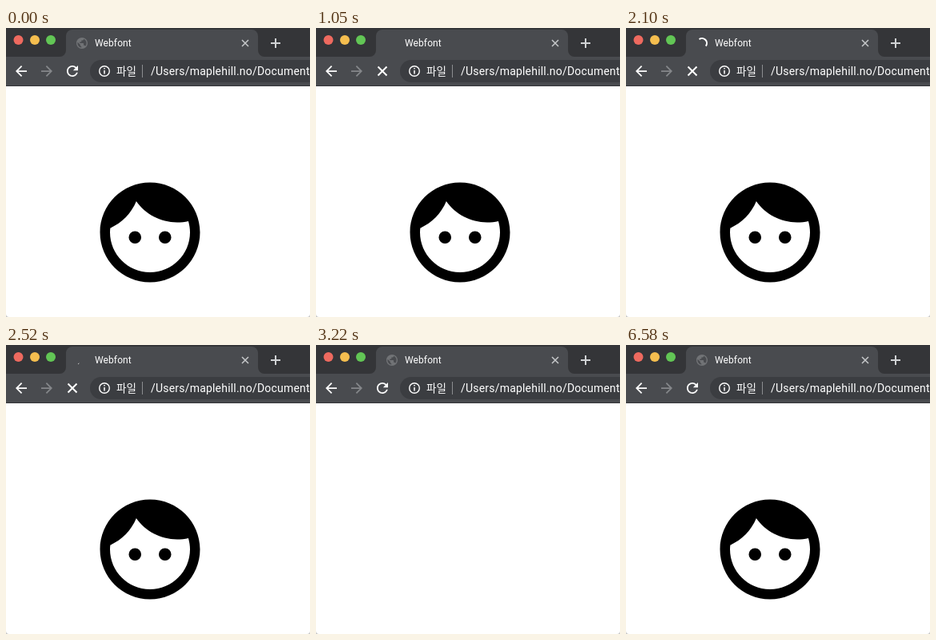
An HTML page that plays this animation: 380 px wide and 362 px high, repeating every 7.21 s.

```html
<!DOCTYPE html>
<html lang="ko">
<head>
<meta charset="utf-8">
<title>Webfont</title>
<style>
  html, body { margin: 0; width: 100%; height: 100%; overflow: hidden; background: #fff; }
  svg { display: block; width: 380px; height: 362px; }
  text { font-family: Roboto, "Noto Sans CJK KR", sans-serif; fill: #fff; white-space: pre; }
  .line { fill: none; stroke: #fff; stroke-width: 2; }
</style>
</head>
<body>
<svg viewBox="0 0 380 362">
  <!-- window frame -->
  <rect width="380" height="73" fill="#343538"/>
  <circle cx="15.5" cy="15" r="6" fill="#ee6a5f"/>
  <circle cx="36" cy="15" r="6" fill="#f5be4f"/>
  <circle cx="56" cy="15" r="6" fill="#62c655"/>
  <path fill="#494b4f" d="M0 36H67a8 8 0 0 0 8-8V10a8 8 0 0 1 8-8H307a8 8 0 0 1 8 8V28a8 8 0 0 0 8 8H380V72H0z"/>
  <path fill="#3b3d41" d="M380 40H119a14 14 0 0 0 0 28H380z"/>

  <!-- tab -->
  <text x="111" y="23" font-size="12" letter-spacing=".1">Webfont</text>
  <path class="line" style="stroke:#c6c8ca;stroke-width:1.5" d="M295 15l8 8m0-8l-8 8"/>
  <path class="line" style="stroke:#d0d2d4" d="M331 19h12m-6-6v12"/>
  <path id="globe" fill="#717376" transform="translate(86.6 10.6) scale(.7)" d="M12 2C6.48 2 2 6.48 2 12s4.48 10 10 10 10-4.48 10-10S17.52 2 12 2zm-1 17.93c-3.95-.49-7-3.85-7-7.93 0-.62.08-1.21.21-1.79L9 15v1c0 1.1.9 2 2 2v1.93zm6.9-2.54c-.26-.81-1-1.39-1.9-1.39h-1v-3c0-.55-.45-1-1-1H8v-2h2c.55 0 1-.45 1-1V7h2c1.1 0 2-.9 2-2v-.41c2.93 1.19 5 4.06 5 7.41 0 2.08-.8 3.97-2.1 5.39z"/>
  <path id="spinner" class="line"/>

  <!-- toolbar -->
  <path id="back" fill="#fff" transform="translate(8.5 43.5) scale(.875)" d="M20 11H7.83l5.59-5.59L12 4l-8 8 8 8 1.41-1.41L7.83 13H20v-2z"/>
  <path fill="#85878a" transform="translate(61.5 43.5) scale(-.875 .875)" d="M20 11H7.83l5.59-5.59L12 4l-8 8 8 8 1.41-1.41L7.83 13H20v-2z"/>
  <path id="reload" fill="#fff" transform="translate(72.5 43.5) scale(.875)" d="M17.65 6.35C16.2 4.9 14.21 4 12 4c-4.42 0-7.99 3.58-7.99 8s3.57 8 7.99 8c3.73 0 6.84-2.55 7.73-6h-2.08c-.82 2.33-3.04 4-5.65 4-3.31 0-6-2.69-6-6s2.69-6 6-6c1.66 0 3.14.69 4.22 1.78L13 11h7V4l-2.35 2.35z"/>
  <path id="stop" class="line" d="M77.5 48.5l11 11m0-11l-11 11"/>
  <circle class="line" cx="123" cy="54" r="6.3" style="stroke-width:1.4"/>
  <path class="line" style="stroke-width:1.5" d="M123 53v4.5m0-7.5v1.6"/>
  <text x="138" y="59" font-size="13.5">파일</text>
  <path stroke="#8b8d90" d="M170.5 46v16"/>
  <text x="181" y="59" font-size="14" letter-spacing=".2">/Users/maplehill.no/Documents</text>

  <!-- page -->
  <path id="face" transform="translate(105 181) scale(6.25)" d="M12 2C6.48 2 2 6.48 2 12s4.48 10 10 10 10-4.48 10-10S17.52 2 12 2zm0 18c-4.41 0-8-3.59-8-8 0-.29.02-.58.05-.86 2.36-1.05 4.23-2.98 5.21-5.37C11.07 8.33 14.05 10 17.42 10c.78 0 1.53-.09 2.25-.26.21.71.33 1.47.33 2.26 0 4.41-3.59 8-8 8zM7.75 13a1.25 1.25 0 0 0 2.5 0a1.25 1.25 0 0 0-2.5 0zm6 0a1.25 1.25 0 0 0 2.5 0a1.25 1.25 0 0 0-2.5 0z"/>
  <text id="word" x="107" y="295" font-size="143" letter-spacing="-5" style="font-family:'Open Sans','Noto Sans',sans-serif;fill:#000">face</text>
  <path fill="#c4c4c4" d="M0 358v4h4a4 4 0 0 1-4-4zm380 0v4h-4a4 4 0 0 0 4-4z"/>
</svg>
<script>
const LOOP = 7210, STEP = 70;
const LOAD = 1050, SPIN = 1260, BLANK = 3220, WORD = 6370, ICON = 6580;
const HALF = 666, TURN = 1568, MAX_ARC = 270, MIN_ARC = 5;
const $ = id => document.getElementById(id);
const show = (id, on) => { $(id).style.display = on ? "" : "none"; };

// cubic-bezier(.4, 0, .2, 1), solved by bisection
function ease(x) {
  let lo = 0, hi = 1;
  for (let i = 0; i < 24; i++) {
    const s = (lo + hi) / 2, r = 1 - s;
    if (1.2 * r * r * s + 0.6 * r * s * s + s * s * s < x) lo = s; else hi = s;
  }
  return lo * lo * (3 - 2 * lo);
}

// An arc that shrinks to a dot, then grows again, while it revolves
function arc(age) {
  const e = age + 700;
  let start = 133 + 360 * e / TURN + MAX_ARC * Math.floor(e / (2 * HALF));
  let sweep = MAX_ARC * ease(e % HALF / HALF);
  if (Math.floor(e / HALF) % 2 === 0) sweep -= MAX_ARC;
  if (Math.abs(sweep) < MIN_ARC) {
    const min = sweep < 0 ? -MIN_ARC : MIN_ARC;
    start -= min - sweep;
    sweep = min;
  }
  const point = deg => {
    const a = deg * Math.PI / 180;
    return `${95 + 6 * Math.cos(a)} ${19 + 6 * Math.sin(a)}`;
  };
  const large = Math.abs(sweep) > 180 ? 1 : 0, clockwise = sweep > 0 ? 1 : 0;
  return `M${point(start)}A6 6 0 ${large} ${clockwise} ${point(start + sweep)}`;
}

function draw(now) {
  const t = Math.floor(now % LOOP / STEP) * STEP;
  const loading = t >= LOAD && t < BLANK, spinning = loading && t >= SPIN;
  show("globe", !loading);
  show("reload", !loading);
  show("stop", loading);
  show("spinner", spinning);
  if (spinning) $("spinner").setAttribute("d", arc(t - SPIN));
  show("face", t < BLANK || t >= ICON);
  show("word", t >= WORD && t < ICON);
}

const begin = performance.now();
function tick() {
  draw(performance.now() - begin);
  requestAnimationFrame(tick);
}
tick();
</script>
</body>
</html>
```
